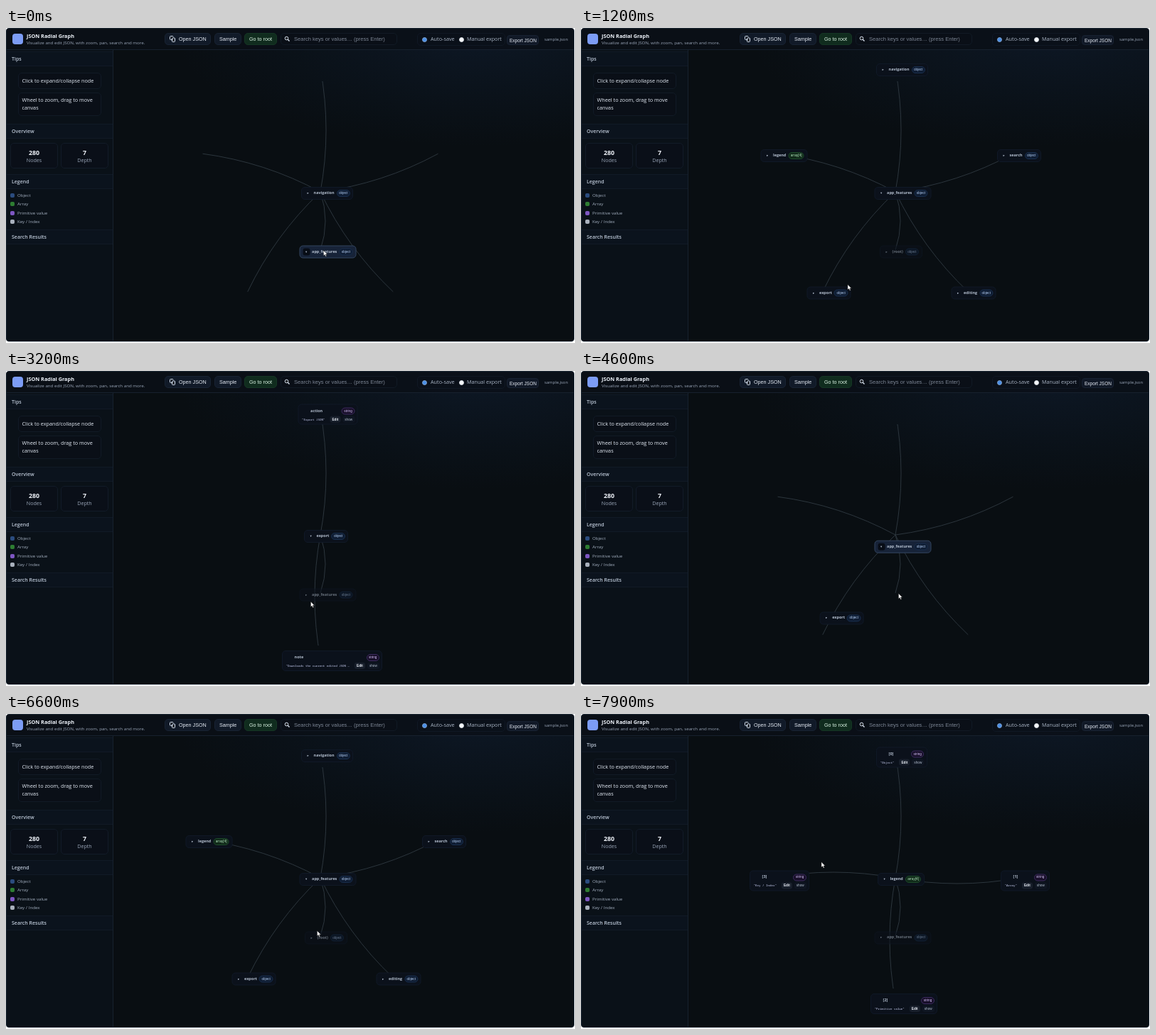
These frames come from a looping animation (800 px wide and 444 px high, 8 s). An HTML page:

```html
<!DOCTYPE html>
<html lang="en">
<head>
<meta charset="utf-8">
<title>JSON Radial Graph</title>
<style>
  html, body { margin: 0; width: 100%; height: 100%; overflow: hidden; background: #fff; }
  body { font-family: "Open Sans", "Noto Sans", sans-serif; color: #dbe4f0; }
  #app { position: absolute; left: 0; top: 0; width: 799px; height: 442px; overflow: hidden;
    border-radius: 4px; box-sizing: border-box; border: 1px solid #16222e;
    background: radial-gradient(420px 150px at 660px 15px, #0d1724, #0a1118 65%, transparent), #090e12; }
  #stage { position: absolute; left: -1px; top: -1px; width: 800px; height: 444px; }
  #stage > * { position: absolute; }
  .box { box-sizing: border-box; }
  .text { transform: translateY(-50%); line-height: 1; white-space: nowrap; }
  .arial, .badge, .btn { font-family: "Liberation Sans", Arial, sans-serif; }
  #graph { inset: 0; clip-path: inset(31px 0 0 151px); }
  #graph svg { position: absolute; left: 0; top: 0; }
  .node { position: absolute; left: 0; top: 0; box-sizing: border-box; white-space: nowrap; line-height: 1;
    background: #0b111b; border: .6px solid #101927; border-radius: 5px; color: #b4bfcf; }
  .pill { height: 18px; margin-top: -9px; padding: 0 3.6px; display: flex; align-items: center; gap: 3px; }
  .card { height: 29px; margin-top: -14.5px; padding: 4px 3.6px 0 4.6px; }
  .row { display: flex; align-items: center; height: 10px; margin-bottom: 1.5px; }
  .row .badge { margin-left: auto; }
  .hot { background: #172338; border-color: #33455f; }
  .chev { width: 10px; height: 10px; border-radius: 3px; text-align: center;
    font: 4.5px/10px "DejaVu Sans", sans-serif; }
  .hot .chev { background: #080d16; }
  .name { font-size: 5.45px; font-weight: 700; }
  .badge { font-size: 4.7px; line-height: 8px; padding: 0 2.4px; border: .6px solid; border-radius: 5px; }
  .object { color: #b3cdf2; border-color: #182d4b; background: #0f1d33; }
  .array { color: #b9ecc4; border-color: #1d4a2a; background: #102a19; }
  .string { color: #d3c0f6; border-color: #3c2b5e; background: #180f29; }
  .value { font: 4.15px "Noto Sans Mono", "DejaVu Sans Mono", monospace; color: #ccd2f6; margin-right: 7px; }
  .btn { font-size: 4.7px; line-height: 9px; padding: 0 3px; border-radius: 3px; background: #0f1622; }
  .edit { font-weight: 700; background: #181f2b; color: #e6ebf3; margin-right: 3px; }
</style>
</head>
<body>
<div id="app"><div id="stage"></div></div>
<script>
const stage = document.getElementById('stage');

function add(parent, html) {
  parent.insertAdjacentHTML('beforeend', html);
  return parent.lastElementChild;
}
const box = (x, y, w, h, fill, line = 'transparent', r = 0) => add(stage,
  `<div class="box" style="left:${x}px;top:${y}px;width:${w}px;height:${h}px;background:${fill};border:1px solid ${line};border-radius:${r}px"></div>`);
const text = (x, y, size, str, color = '#e4ebf5', weight = 400, cls = '') => add(stage,
  `<div class="text ${cls}" style="left:${x}px;top:${y}px;font-size:${size}px;color:${color};font-weight:${weight}">${str}</div>`);
const icon = (x, y, w, h, body) => add(stage,
  `<svg style="left:${x}px;top:${y}px" width="${w}" height="${h}" fill="none" stroke="#dbe4f0">${body}</svg>`);

// Header
box(0, 0, 800, 31, '#0a0f17cc');
box(0, 30, 800, 1, '#17212e').style.border = 0;
box(9, 8, 15, 15, '#7c9cf5', 'transparent', 4);
text(29, 11.5, 7.3, 'JSON Radial Graph', '#eef3fa', 700);
text(29, 20.8, 6.17, 'Visualize and edit JSON, with zoom, pan, search and more.', '#9aa6b8');
box(223, 7, 65, 17, '#111a28', '#182333', 5);
icon(229, 10, 10, 11, '<path d="M5.5 6.5H2.5a1 1 0 0 1-1-1V2.5a1 1 0 0 1 1-1h3l1 1M4.5 5a1 1 0 0 1 1-1h2a1 1 0 0 1 1 1v3.5a1 1 0 0 1-1 1h-2a1 1 0 0 1-1-1z"/>');
text(243, 15.5, 7.2, 'Open JSON', '#e6ecf5', 400, 'arial');
box(293, 7, 38, 17, '#111a28', '#182333', 5);
text(300, 15.5, 7.2, 'Sample', '#e6ecf5', 400, 'arial');
box(335, 7, 46, 17, '#102c1e', '#153624', 5);
text(342, 15.5, 7.2, 'Go to root', '#dcf5e4', 400, 'arial');
box(386, 7, 164, 17, '#0a0f17', '#111a25', 5);
icon(391, 11, 9, 9, '<circle cx="3.5" cy="3.5" r="2.3"/><path d="M5.3 5.3 7.5 7.5" stroke-width="1.3"/>');
text(405, 15.5, 7.57, 'Search keys or values… (press Enter)', '#7c8594', 400, 'arial');
box(578, 7, 124, 18, '#0a1019', '#101824', 5);
box(584.5, 12.5, 7, 7, '#4a90e8', '#7f9fc8', 4);
text(597, 16, 7.3, 'Auto-save', '#aab5c5');
box(636.5, 12.5, 7, 7, '#f4f6f8', '#d4d9e0', 4);
text(648, 16, 7.2, 'Manual export', '#aab5c5');
box(704, 10, 45, 14, '#111927', '#182232', 4);
text(708, 17.5, 6.5, 'Export JSON', '#e6ecf5', 400, 'arial');
text(757, 17.3, 5.9, 'sample.json', '#9aa6b8');

// Sidebar
box(0, 31, 151, 411, '#0a1118');
box(150, 31, 1, 411, '#17212e').style.border = 0;
[['Tips', 43], ['Overview', 145], ['Legend', 215.5], ['Search Results', 293.5]].forEach(([title, y]) => {
  box(0, y - 10, 150, 21, '#0b131d', '#111a26').style.borderWidth = '1px 0';
  text(8, y, 7, title, '#bcc7d6', 600);
});
box(17, 63, 117, 23, '#0a0f17', '#111a26', 5);
text(22.5, 74.7, 7.27, 'Click to expand/collapse node');
box(17, 91, 117, 33, '#0a0f17', '#111a26', 5);
text(22.5, 101.5, 7.27, 'Wheel to zoom, drag to move');
text(22.5, 112.8, 7.27, 'canvas');
[[6, '280', 'Nodes'], [77, '7', 'Depth']].forEach(([x, num, label]) => {
  box(x, 162, 67, 36, '#0a0f18', '#121b28', 5);
  [text(x, 175.5, 8.8, num, '#f0f4fa', 700), text(x, 187.3, 7.15, label, '#9aa6b8')].forEach(el => {
    el.style.width = '67px';
    el.style.textAlign = 'center';
  });
});
[['Object', '#2b4c7e'], ['Array', '#2e7d32'], ['Primitive value', '#7e57c2'], ['Key / Index', '#a9b1bd']].forEach(([label, color], i) => {
  const y = 235.5 + i * 12.6;
  box(6, y - 3, 6, 6, color, color, 1.5);
  text(16, y, 6.17, label, '#a3afbf');
});

// Graph
const HUB = [442, 231], RADIUS = 174;
const graph = add(stage, '<div id="graph"></div>');
const edges = add(graph, `<svg width="800" height="444"><clipPath id="band"><path d="M0 75H800V387H0z"/></clipPath>
  <path class="edges" clip-path="url(#band)" fill="none" stroke="#303a42" stroke-width=".9"/></svg>`).querySelector('.edges');

const pill = (name, type = 'object') => add(graph,
  `<div class="node pill"><span class="chev"></span><span class="name">${name}</span><span class="badge ${type.startsWith('array') ? 'array' : 'object'}">${type}</span></div>`);
const card = (name, value) => add(graph,
  `<div class="node card"><div class="row"><span class="name" style="margin-left:12px">${name}</span><span class="badge string">string</span></div>
  <div class="row"><span class="value">${value}</span><span class="btn edit">Edit</span><span class="btn">show</span></div></div>`);

const nodes = {
  root: pill('(root)'), app: pill('app_features'), nav: pill('navigation'), search: pill('search'),
  editing: pill('editing'), exp: pill('export'), legend: pill('legend', 'array[4]'),
  action: card('action', '"Export JSON"'), note: card('note', '"Downloads the current edited JSON …'),
  i0: card('[0]', '"Object"'), i1: card('[1]', '"Array"'),
  i2: card('[2]', '"Primitive value"'), i3: card('[3]', '"Key / Index"')
};

// Each view: hub, parent, number of children, and [left, middle] of every node
const views = {
  nav: { hub: 'nav', parent: 'app', at: { nav: [415, 233], app: [412.5, 315.5] } },
  app: { hub: 'app', parent: 'root', kids: 5, at: {
    app: [412.5, 233], root: [420, 315.5], nav: [415, 59], search: [585, 180],
    editing: [520.5, 373.5], exp: [317.5, 373.5], legend: [252.5, 180] } },
  exp: { hub: 'exp', parent: 'app', kids: 2, at: {
    exp: [419, 233], app: [412.5, 315.5], action: [410.5, 60.5], note: [388, 408] } },
  legend: { hub: 'legend', parent: 'app', kids: 4, at: {
    legend: [417, 233], app: [412.5, 315.5], i0: [415, 60.5], i1: [590, 234.5],
    i2: [407, 408], i3: [237, 234.5] } }
};
// [shown from, lead time already run, old view, new view]
const moves = [[0, 0, 'nav', 'app'], [1800, 100, 'app', 'exp'], [4600, 100, 'exp', 'app'], [7500, 100, 'app', 'legend']];

function edgePath(count) {
  const [x, y] = HUB;
  let d = `M${x} 313Q${x + 14} 272 ${x} ${y}`;
  for (let i = 0; i < count; i++) {
    const a = (i / count - .25) * 2 * Math.PI, c = Math.cos(a), s = Math.sin(a);
    d += `M${x} ${y}Q${x + c * RADIUS / 2 - s * 16} ${y + s * RADIUS / 2 + c * 16} ${x + c * RADIUS} ${y + s * RADIUS}`;
  }
  return d;
}

const mix = (a, b, p) => a.map((v, i) => v + (b[i] - v) * p);

function drawGraph(t) {
  const [start, lead, oldName, newName] = moves.filter(m => m[0] <= t).pop();
  const old = views[oldName], view = views[newName], dt = t - start + lead;
  const glide = 1 - Math.exp(-dt / 58);
  const entry = 1 - Math.exp(-.875 * ((dt - 100) / 100) ** 2);
  const last = Object.keys(view.at).pop();
  edges.setAttribute('d', edgePath(view.kids));
  for (const id in nodes) {
    const el = nodes[id], end = view.at[id], begin = old.at[id];
    const shown = end && (begin || dt >= (id === last ? 200 : 300));
    el.style.visibility = shown ? 'visible' : 'hidden';
    if (!shown) continue;
    const [x, y] = begin ? mix(begin, end, glide) : mix([81, 91], end, entry);
    el.style.transform = `translate(${x}px,${y}px)`;
    el.style.opacity = id === view.parent ? .55 : 1;
    el.classList.toggle('hot', id === view.hub && dt < 300);
    const chev = el.querySelector('.chev');
    if (chev) chev.textContent = id === view.hub ? '▾' : '▸';
  }
}

// Pointer: time, x, y
const track = [[0, 446, 313], [1100, 446, 313], [1200, 374.5, 361], [1600, 353.5, 369.5], [2100, 353.5, 369.5],
  [2800, 428, 324.5], [3400, 428, 324.5], [4100, 446, 313], [6500, 446, 313], [6600, 437, 305],
  [7300, 300, 178], [7500, 300, 178], [7900, 337.5, 208], [8000, 337.5, 208]];
const pointer = add(stage, `<svg style="left:0;top:0" width="8" height="11">
  <path d="M.4.4V8L2.2 6.5 3.4 9.2 4.7 8.6 3.5 6H5.8z" fill="#fff" stroke="#111" stroke-width=".5"/></svg>`);

function drawPointer(t) {
  const i = track.findIndex(k => k[0] > t), a = track[i - 1], b = track[i];
  const [, x, y] = mix(a, b, (t - a[0]) / (b[0] - a[0]));
  pointer.style.transform = `translate(${x}px,${y}px)`;
}

const begun = performance.now();
function frame() {
  const t = Math.floor((performance.now() - begun) % 8000 / 100) * 100;
  drawGraph(t);
  drawPointer(t);
  requestAnimationFrame(frame);
}
frame();
</script>
</body>
</html>
```
